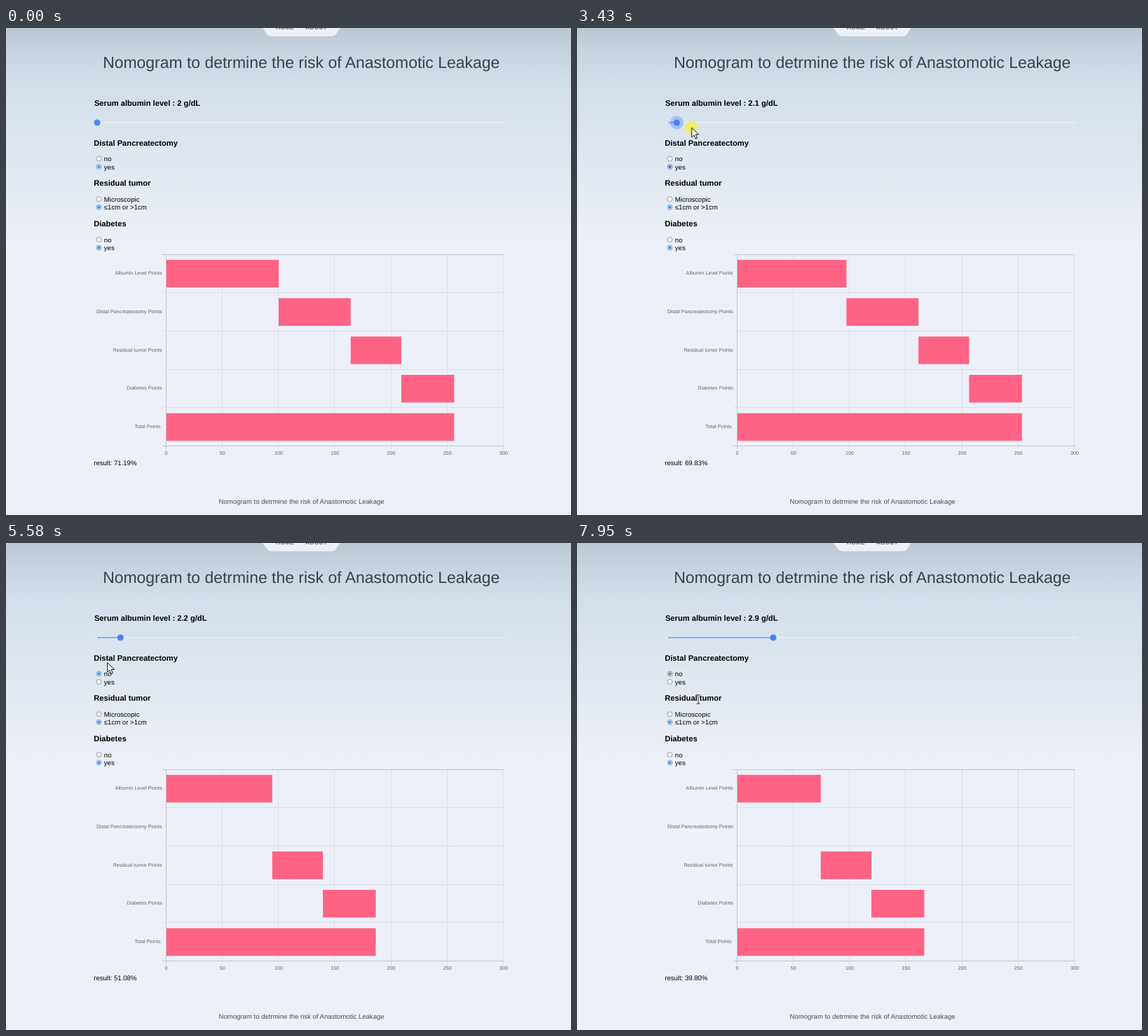
An HTML page that plays this animation: 806x695 px, repeating every 8000 ms.

```html
<!DOCTYPE html>
<html lang="en">
<head>
<meta charset="utf-8">
<title>Nomogram</title>
<style>
  html, body { margin: 0; width: 100%; height: 100%; overflow: hidden; background: #edf0f8; }
  svg { display: block; font-family: "Liberation Sans", Arial, sans-serif; text-rendering: geometricPrecision; }
</style>
</head>
<body>
<svg id="stage" width="806" height="695" viewBox="0 0 806 695">
  <defs>
    <linearGradient id="sky" x1="0" y1="0" x2="0" y2="1">
      <stop offset="0" stop-color="#bbc7d3"/>
      <stop offset=".1" stop-color="#c6d3df"/>
      <stop offset=".26" stop-color="#d2dee9"/>
      <stop offset=".6" stop-color="#dfe7f0"/>
      <stop offset="1" stop-color="#edf0f8"/>
    </linearGradient>
  </defs>
  <rect width="806" height="695" fill="#edf0f8"/>
  <rect width="806" height="310" fill="url(#sky)"/>
  <path d="M366 0L372.500 9Q374.500 11.800 378 11.800H465Q468.500 11.800 470.500 9L476.500 0Z" fill="#edf0f7"/>
</svg>
<script>
const LOOP = 8000;
const stage = document.getElementById('stage');

function add(tag, attrs, parent = stage) {
  const el = document.createElementNS('http://www.w3.org/2000/svg', tag);
  set(el, attrs);
  parent.appendChild(el);
  return el;
}
function set(el, attrs) {
  for (const k in attrs) el.setAttribute(k, attrs[k]);
}
function text(str, x, y, size, fill = '#000', more = {}) {
  const el = add('text', { x, y, 'font-size': size, fill, ...more });
  el.textContent = str;
  return el;
}
function line(x1, y1, x2, y2, stroke) {
  add('path', { d: `M${x1} ${y1}L${x2} ${y2}`, stroke, 'stroke-width': 1 });
}
const show = (el, on) => el.setAttribute('visibility', on ? 'visible' : 'hidden');
const clamp = (v, lo, hi) => Math.min(hi, Math.max(lo, v));
const bold = { 'font-weight': 'bold' };
const mid = { 'text-anchor': 'middle' };
const end = { 'text-anchor': 'end' };

// Page text
const nav = { 'font-weight': 'bold', 'letter-spacing': 0.4 };
text('HOME', 385, 1.6, 8.2, '#56667c', nav);
text('ABOUT', 427, 1.6, 8.2, '#56667c', nav);
const title = 'Nomogram to detrmine the risk of Anastomotic Leakage';
text(title, 421.2, 57.3, 22.95, '#39414b', mid);
text(title, 421.6, 679, 9.57, '#4a5058', mid);
const level = text('', 125.9, 111.2, 11.16, '#000', bold);
const result = text('', 125.2, 623.5, 9.58);

// Radio groups
function radio(label, y) {
  text(label, 139.8, y + 3.5, 9.6);
  const ring = add('circle', { cx: 132.5, cy: y, r: 3.5, fill: '#f4f7fa', 'stroke-width': 0.8 });
  const dot = add('circle', { cx: 132.5, cy: y, r: 2.1 });
  return color => {
    set(ring, { stroke: color || '#858b93' });
    set(dot, { fill: color || 'none' });
  };
}
const groups = [
  ['Distal Pancreatectomy', 'no', 'yes'],
  ['Residual tumor', 'Microscopic', '≤1cm or >1cm'],
  ['Diabetes', 'no', 'yes']
].map(([name, first, second], i) => {
  const y = 167.6 + i * 57.7;
  text(name, 125.2, y, 11.17, '#000', bold);
  return [radio(first, y + 19), radio(second, y + 30.4)];
});
const BLUE = '#3a8ae0', DIM = '#3c5f9f', GREY = '#6c7788';
for (const [off, on] of groups) { off(null); on(BLUE); }

// Chart
const X0 = 228.5, UNIT = 1.605, TOP = 323, ROW = 54.72;
const GRID = '#dcdfe6', EDGE = '#c1c5cc';
const px = v => X0 + v * UNIT;
for (let v = 0; v <= 300; v += 50) {
  const x = Math.floor(px(v) - 0.3) + 0.5;
  line(x, TOP, x, 602, v ? GRID : EDGE);
  text(v, px(v), 609, 7.18, '#666', mid);
}
for (let i = 0; i <= 5; i++) {
  const y = Math.floor(TOP + i * ROW) + 0.5;
  line(223, y, 710, y, i % 5 ? GRID : EDGE);
}
const labels = ['Albumin Level', 'Distal Pancreatectomy', 'Residual tumor', 'Diabetes', 'Total'];
const bars = labels.map((name, i) => {
  const y = TOP + ROW * (i + 0.5);
  text(name + ' Points', name === 'Total' ? 220.6 : 222.6, y + 1.9, 7.18, '#666', end);
  return add('rect', { y: y + 0.2 - ROW * 0.36, height: ROW * 0.72, fill: '#ff6384' });
});
function setBar(bar, from, size) {
  const left = Math.max(px(from), X0 + 0.4);
  set(bar, { x: left, width: Math.max(0, px(from + size) - left) });
}

// Slider
const MIN = 130, SPAN = 583, LOW = 2, HIGH = 5.5;
add('rect', { x: 126, y: 134, width: 587, height: 2, fill: '#e9ebef' });
const fill = add('rect', { x: MIN, y: 134, height: 2, fill: '#80b3fb' });
const halo = add('circle', { cy: 135, r: 9.6, fill: '#5683f5', 'fill-opacity': 0.38 });
const thumb = add('circle', { cy: 135, r: 4.6 });
const toValue = x => Math.round((LOW + (x - MIN) / SPAN * (HIGH - LOW)) * 10) / 10;
const toX = v => MIN + (v - LOW) / (HIGH - LOW) * SPAN;

// Pointer
const pointer = add('g', {});
const glow = add('circle', { cx: -0.2, cy: 0.3, r: 9.6, fill: '#f0ef55', 'fill-opacity': 0.85 }, pointer);
const arrow = add('path', {
  d: 'M.3.3V13.700L3.400 10.900L5.800 16.200L8 15.200L5.700 10H10Z',
  fill: '#fff', stroke: '#111', 'stroke-width': 1, 'stroke-linejoin': 'round'
}, pointer);
const beam = add('path', {
  d: 'M-2.500-6.500H-.8L0-6L.8-6.500H2.500M0-6V6M-2.500 6.500H-.8L0 6L.8 6.500H2.500',
  fill: 'none', stroke: '#222', 'stroke-width': 0.9
}, pointer);

// Turning points of the hand: time, x, y
const path = [
  [400, 797, 661], [1000, 160, 97], [1590, 141, 131], [1790, 141, 132],
  [2000, 200.5, 140], [2560, 713, 151], [3200, 92, 142], [3430, 162.5, 142],
  [3720, 560, 144], [3900, 797, 150], [4420, 164, 145], [4570, 165, 172],
  [4780, 134, 187], [5300, 134, 187], [5910, 163, 143], [6500, 175, 138],
  [6590, 420.5, 138], [6760, 701, 140], [7200, 164, 140], [7600, 282, 142],
  [7950, 173, 223]
];
const drags = [[1790, 4420], [6400, 7600]];
const CLICK = 5190, LAG = 26;

// Smooth curve through the points that never overshoots them
function slope(i, j) {
  const a = path[i - 1], b = path[i], c = path[i + 1];
  if (!a || !c || (b[j] - a[j]) * (c[j] - b[j]) <= 0) return 0;
  return (c[j] - a[j]) / (c[0] - a[0]);
}
function hand(t) {
  t = clamp(t, path[0][0], path[path.length - 1][0]);
  const i = Math.max(1, path.findIndex(k => k[0] >= t));
  const a = path[i - 1], b = path[i], len = b[0] - a[0];
  const p = (t - a[0]) / len, q = 1 - p;
  return [1, 2].map(j =>
    a[j] * q * q * (1 + 2 * p) + b[j] * p * p * (3 - 2 * p) +
    len * p * q * (slope(i - 1, j) * q - slope(i, j) * p));
}

// The thumb trails the hand, and snaps to a whole step on release
function thumbAt(t) {
  const drag = drags.filter(d => d[0] <= t).pop();
  if (!drag) return MIN;
  const x = clamp(hand(Math.min(t, drag[1]) - LAG)[0], MIN, MIN + SPAN);
  return t < drag[1] ? x : toX(toValue(x));
}

function draw(t) {
  const tx = thumbAt(t), value = toValue(tx);
  const [cx, cy] = hand(t);
  const dragging = drags.some(([a, b]) => t >= a && t < b);
  const no = t >= CLICK;

  set(fill, { width: tx - MIN });
  set(halo, { cx: tx });
  set(thumb, { cx: tx, fill: t < drags[0][0] ? '#4a90e8' : '#4d82f4' });
  show(halo, dragging);
  level.textContent = `Serum albumin level : ${value} g/dL`;

  let sum = 0;
  [(HIGH - value) / (HIGH - LOW) * 100, no ? 0 : 64, 45, 47].forEach((p, i) => {
    setBar(bars[i], sum, p);
    sum += p;
  });
  setBar(bars[4], 0, sum);

  const logit = 0.90463 - 0.65295 * (value - LOW) - (no ? 0.73065 : 0);
  result.textContent = `result: ${(100 / (1 + Math.exp(-logit))).toFixed(2)}%`;

  const [pickNo, pickYes] = groups[0];
  pickNo(no ? (t < 7690 ? BLUE : GREY) : null);
  pickYes(no ? null : t < 1120 ? BLUE : DIM);

  const overText = t >= 7880;
  set(pointer, { transform: `translate(${cx} ${cy})` });
  show(glow, dragging || Math.abs(t - CLICK) < 70);
  show(arrow, t >= path[0][0] && !overText);
  show(beam, overText);
}

const start = performance.now();
function tick() {
  draw((performance.now() - start) % LOOP);
  requestAnimationFrame(tick);
}
tick();
</script>
</body>
</html>
```
